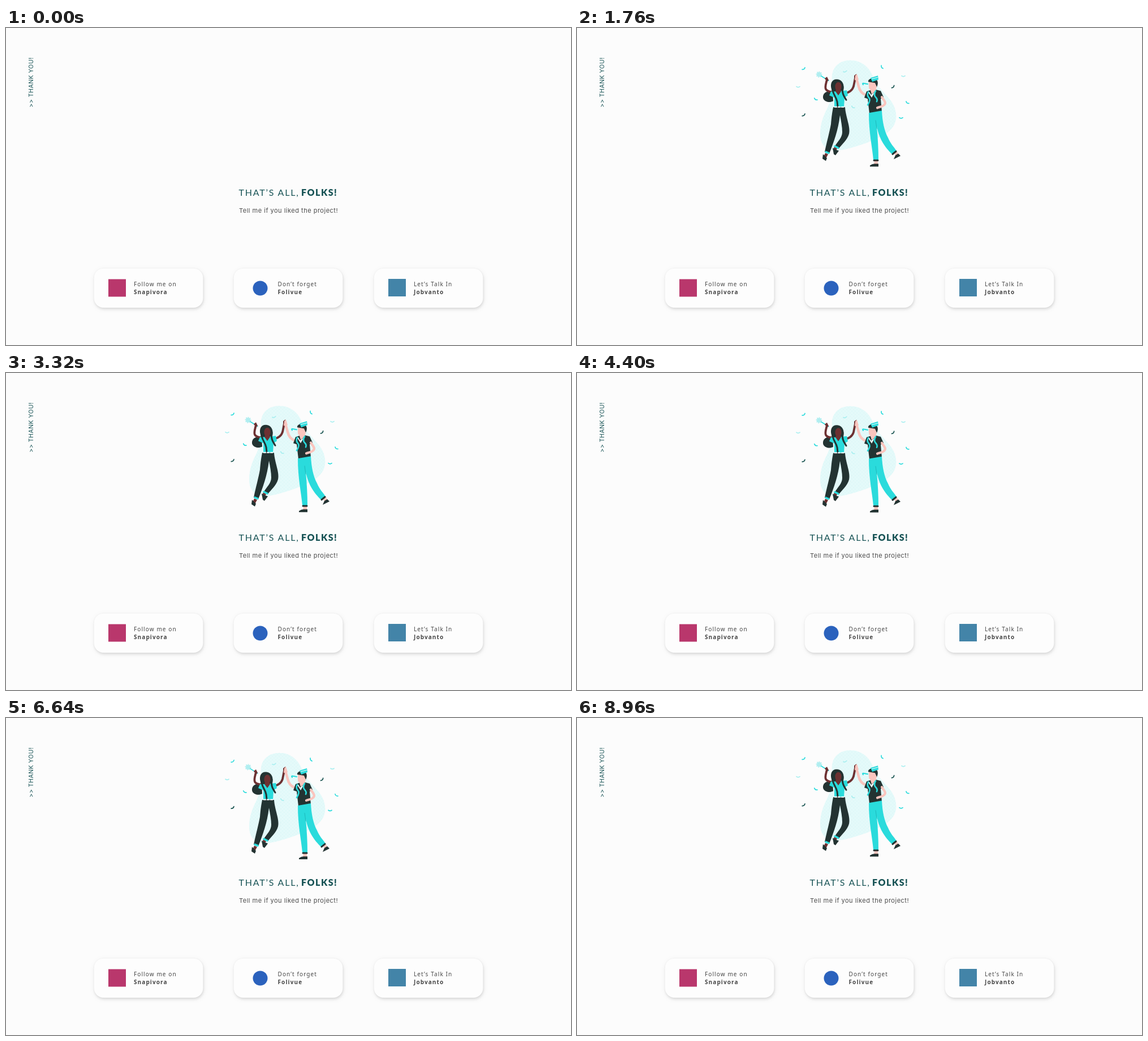
Write an HTML page that moves like this. It is 999x561 px and loops after 9040 ms.

```html
<!DOCTYPE html>
<html lang="en">
<head>
<meta charset="utf-8">
<title>Thank you</title>
<style>
  html, body { margin: 0; height: 100%; overflow: hidden; background: #fcfcfc; }
  svg { display: block; width: 999px; height: 561px; }
  .inter { font-family: Inter, sans-serif; }
  .title { font: 16px Lato, sans-serif; letter-spacing: 1.8px; fill: #175355; }
  .title .strong { font-weight: 900; letter-spacing: 1.5px; }
  .card { fill: #fdfdfd; filter: drop-shadow(0 0 1px #0001) drop-shadow(1px 3px 2px #00000016) drop-shadow(1px 2px 4px #00000010); }
  .label { font: 500 10px "Noto Sans", sans-serif; letter-spacing: 1.1px; fill: #454545; }
  .label .strong { font-weight: 800; }
  .limb { fill: none; stroke-linecap: round; stroke-linejoin: round; }
  .dark { fill: #233332; }
  .teal { fill: #2adbdc; }
  .skin { fill: #fac5be; }
  .brown { fill: #6d3132; }
</style>
</head>
<body>
<svg id="stage" viewBox="0 0 999 561">
  <defs>
    <pattern id="weave" width="6" height="6" patternUnits="userSpaceOnUse">
      <path d="M0 0L6 6M6 0L0 6" stroke="#daf6f7" stroke-width=".6"/>
    </pattern>
    <path id="blob" d="M481 57C460 58 449 73 451 92C455 115 449 128 440 147C430 167 427 190 433 203C440 217 456 219 476 214C505 207 533 196 550 184C565 172 568 155 560 137C552 120 532 108 523 85C515 66 500 56 481 57Z"/>
  </defs>

  <text class="inter" transform="translate(48 140.500) rotate(-90)" font-size="10.5" letter-spacing=".5" fill="#175355">&gt;&gt; THANK YOU!</text>
  <text class="title" x="411.500" y="296.500">THAT’S ALL, <tspan class="strong" x="522">FOLKS!</tspan></text>
  <text class="inter" x="412" y="327" font-size="11" letter-spacing=".5" fill="#4c4c4c">Tell me if you liked the project!</text>
  <g id="cards"></g>

  <g id="scene" opacity="0">
    <use href="#blob" fill="#e5fafa"/>
    <use href="#blob" fill="url(#weave)"/>
    <g id="confetti" class="limb" stroke-width="1.7"></g>

    <g id="woman">
      <path class="limb" d="M429 83L445 93" stroke="#2adbdc" stroke-width="1.6"/>
      <circle cx="428" cy="82" r="4" fill="#b0eef0" stroke="#b0eef0" stroke-width="3" stroke-dasharray="1.6 1.4"/>
      <path class="dark" d="M452 111C442 110 434 115 435 123C436 130 446 133 453 129Z"/>
      <path class="limb" d="M442 91C440 99 438 104 440 108C443 113 449 112 454 114M472 116C482 114 487 110 489 103L492 88" stroke="#6d3132" stroke-width="3.800"/>
      <path class="brown" d="M438 89L442 86L445 92L442 95ZM490 92L490 84L494 81L495 91Z"/>
      <path class="dark" d="M460 90.500C451 90 447 98 450 108L452 118H468C473 111 475 92 460 90.500Z"/>
      <path class="teal" d="M449 112L458 112L468 111L477 110L479 119L473 123L472 140L455 140L455 123L446 119Z"/>
      <path class="brown" d="M458 109L466 109L467 112L462 119L457 112Z"/>
      <path class="limb" d="M452 106C451 116 458 120 460 130L461 139M470 104C468 114 471 119 476 127" stroke="#233332" stroke-width="3"/>
      <ellipse class="brown" cx="462" cy="103.500" rx="5.600" ry="8"/>
      <path class="dark" d="M453 140H474C475 157 484 175 481 187C478 198 468 206 463 213L456 209C461 200 469 194 469 184C469 175 467 165 465 154C462 180 454 202 446 222L438 219C442 200 446 186 449 170C450 158 451 150 453 140Z"/>
      <path d="M455 139.500H473" stroke="#fff" stroke-width="2" stroke-dasharray="5 1"/>
      <path class="brown" d="M439 221L444 223L441 229L436 227ZM455 210L460 213L458 217L453 215Z"/>
      <path class="limb" d="M440 219L445 221M456 209L462 212" stroke="#2adbdc" stroke-width="3.400"/>
      <path class="dark" d="M435 223L442 230L440 235L434 231ZM452 212L457 215L463 217L457 225L454 223Z"/>
    </g>

    <g id="man">
      <path class="limb" d="M513 119C505 117 500 112 498 103L494 89" stroke="#fac5be" stroke-width="4.600"/>
      <path class="skin" d="M491 92L492 84L495 81L498 91Z"/>
      <path class="dark" d="M512 112L518 110L529 109L537 111L542 122L537 125L539 148L517 151L514 125L508 123Z"/>
      <path class="limb" d="M539 122C542 127 547 131 544 135C541 139 536 139 531 141" stroke="#fac5be" stroke-width="4.200"/>
      <path class="skin" d="M516 95L529 94L530 104L528 111L521 117L519 110L516 106Z"/>
      <path class="dark" d="M515 95C514 91 520 88 526 89C533 91 533 99 530 104L527 97Z"/>
      <path class="limb" d="M514 99L506 97.500Q504 98 506 100" stroke="#2adbdc" stroke-width="2"/>
      <path d="M514 112L521 123L528 111L524 115L520 118L517 113Z" fill="#f0fbfb"/>
      <path class="limb" d="M515 113Q512 119 516 123T514 136M528 111Q524 118 528 122T530 130" stroke="#2adbdc" stroke-width="2.600"/>
      <path class="teal" d="M519 88L532 84L533 91L522 95Z"/>
      <path d="M521 90L532 87" stroke="#b5f1f1" stroke-width="1.600"/>
      <path class="skin" d="M526 234H532V242H525ZM561 221L566 218L568 223L563 226Z"/>
      <path class="teal" d="M516 150L539 146C540 165 543 181 550 194C554 204 560 210 565 217L557 223C545 211 535 198 530 174C532 195 533 215 533 233H524C522 210 516 185 516 150Z"/>
      <path d="M528 163L530 178" stroke="#1db9bc" stroke-width="1"/>
      <path class="limb" d="M525 234H532M558 223L564 218" stroke="#233332" stroke-width="3"/>
      <path class="dark" d="M518 243Q522 240 526 240H533V245H518ZM560 232L563 225L568 222L572 226Z"/>
    </g>
  </g>
</svg>
<script>
const LOOP = 9040, INTRO_START = 60, INTRO_END = 1010, FLOAT_PERIOD = 1440;
const byId = id => document.getElementById(id);

const cards = [
  { x: 155.5, textX: 226, lines: ['Follow me on', 'Snapivora'],
    badge: '<rect x="181" y="444.5" width="31" height="31" fill="#b9376c"/>' },
  { x: 402.5, textX: 480.5, lines: ['Don’t forget', 'Folivue'],
    badge: '<circle cx="449.5" cy="460.5" r="13" fill="#2b62bd"/>' },
  { x: 650.5, textX: 721, lines: ['Let’s Talk In', 'Jobvanto'],
    badge: '<rect x="676" y="444" width="31" height="31" fill="#4384a8"/>' },
];
byId('cards').innerHTML = cards.map(({ x, textX, lines, badge }) => `
  <rect class="card" x="${x}" y="425.5" width="193" height="69.5" rx="17"/>${badge}
  <text class="label" x="${textX}" y="457">${lines[0]}
    <tspan class="strong" x="${textX}" y="471.3">${lines[1]}</tspan></text>`).join('');

const TEAL = '#2adbdc', PALE = '#a9eff0', DARK = '#17524f';
const confetti = [
  [401, 72, -35, TEAL], [391, 104, 0, PALE], [422, 126, 30, TEAL], [401, 154, -38, DARK],
  [474, 77, -15, PALE], [539, 69, 60, TEAL], [577, 85, 0, PALE], [559, 104, -45, DARK],
  [584, 132, 35, TEAL], [573, 159, 0, TEAL], [488, 140, 30, PALE],
];
byId('confetti').innerHTML = confetti.map(([x, y, angle, color]) =>
  `<path d="M-3 -.7Q0 1.8 3 -.7" stroke="${color}" transform="translate(${x} ${y}) rotate(${angle})"/>`).join('');

const bezier = (a, b, u) => 3 * (1 - u) ** 2 * u * a + 3 * (1 - u) * u * u * b + u ** 3;

// Cubic bezier easing (.36, -.01, .5, 1.38), overshooting near the end.
function overshoot(x) {
  let low = 0, high = 1;
  for (let i = 0; i < 24; i++) {
    const mid = (low + high) / 2;
    if (bezier(.36, .5, mid) < x) low = mid; else high = mid;
  }
  return bezier(-.01, 1.38, low);
}

function draw(now) {
  const t = now % LOOP;
  const intro = Math.min(1, Math.max(0, (t - INTRO_START) / (INTRO_END - INTRO_START)));
  const progress = intro < 1 ? overshoot(intro) : 1;
  const phase = Math.max(0, t - INTRO_END) / FLOAT_PERIOD % 1;
  const x = 30 * (1 - progress), y = 6 * Math.abs(1 - 2 * phase);
  const scene = byId('scene');
  scene.setAttribute('transform', `translate(${x} ${y})`);
  scene.setAttribute('opacity', t < 160 ? 0 : Math.min(1, progress));
}

const start = performance.now();
function tick() {
  draw(performance.now() - start);
  requestAnimationFrame(tick);
}
tick();
</script>
</body>
</html>
```
